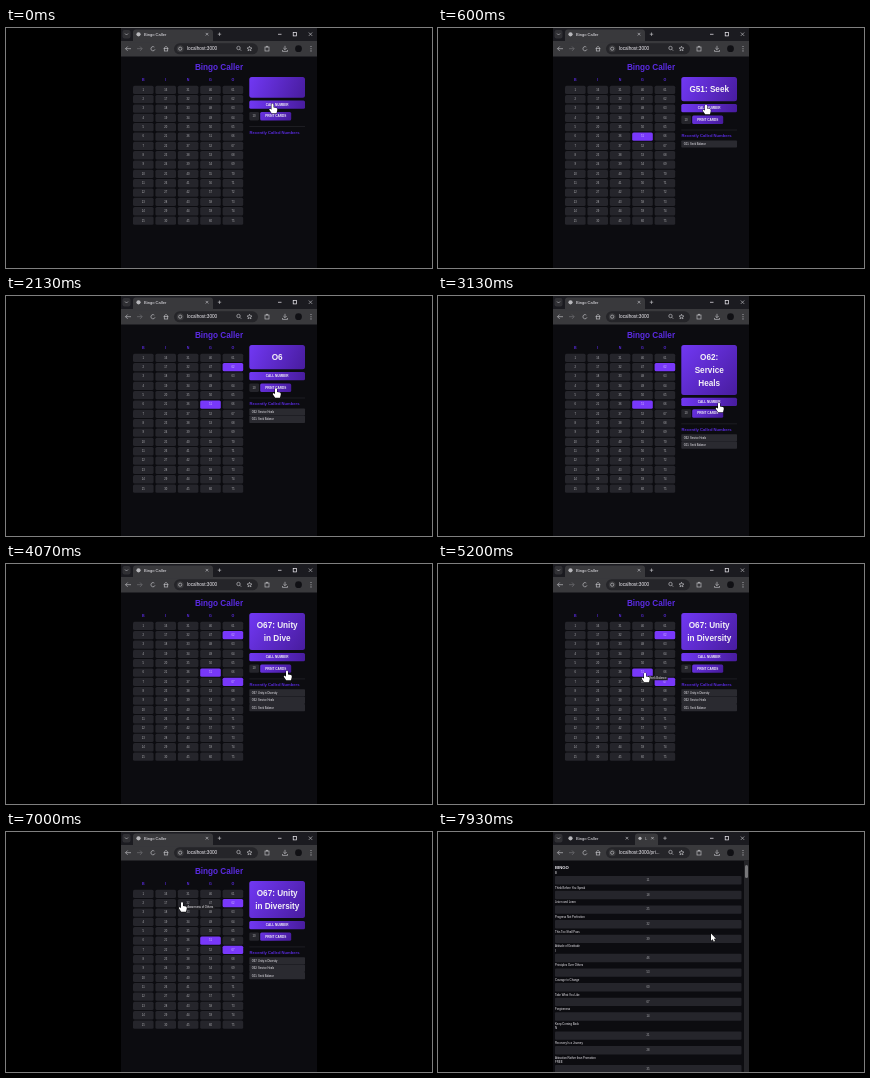
Recreate the animation shown at these times as an HTML page with a canvas. Size 426 by 240 pixels, loop 8000 ms.

```html
<!DOCTYPE html>
<html lang="en">
<head>
<meta charset="utf-8">
<title>Bingo Caller</title>
<style>
  html, body { margin: 0; width: 100%; height: 100%; overflow: hidden; background: #000; }
  canvas { display: block; width: 426px; height: 240px; }
</style>
</head>
<body>
<canvas id="stage"></canvas>
<script>
const LOOP = 8000, TYPE_MS = 50, CARDS_AT = 7800;
const BG = '#0c0c10', CELL = '#25252b', CHROME = '#39393c', STRIP = '#1b1b20';
const WHITE = '#f2f0f6', GREY = '#b8b8bc', VIOLET = '#5a2be0', BRIGHT = '#7838fa';

const calls = [
  { at: 130, col: 3, row: 5, text: 'G51: Seek Balance' },
  { at: 2000, col: 4, row: 1, text: 'O62: Service Heals' },
  { at: 3170, col: 4, row: 6, text: 'O67: Unity in Diversity' }
];

// Pointer path: time, x, y of the hotspot
const pointerPath = [
  [0, 266.5, 75.5], [350, 268, 76.5], [1350, 268, 76.5], [1750, 270, 92], [2250, 270, 92],
  [2900, 281, 106.5], [4250, 281, 106.5], [4850, 207, 108.5], [5450, 207, 108.5],
  [6500, 176, 70], [7100, 176, 70], [7550, 273, 101.5], [8000, 273, 101.5]
];

const tips = [
  { from: 4900, to: 5500, x: 210, y: 114, text: 'Seek Balance' },
  { from: 6550, to: 7120, x: 180, y: 75.5, text: 'Awareness of Others' }
];

const card = [
  ['BINGO', 'B', ['Think Before You Speak', 'Listen and Learn', 'Progress Not Perfection',
    'This Too Shall Pass', 'Attitude of Gratitude']],
  ['', 'I', ['Principles Over Others', 'Courage to Change', 'Take What You Like',
    'Forgiveness', 'Keep Coming Back']],
  ['', 'N', ['Recovery Is a Journey', 'Attraction Rather than Promotion']],
  ['', 'FREE', ['Easy Does It']]
];

const canvas = document.getElementById('stage');
const ctx = canvas.getContext('2d');
const dpr = window.devicePixelRatio || 1;
canvas.width = 426 * dpr;
canvas.height = 240 * dpr;

const handShape = new Path2D('M-1 1Q0-.8 1 1V4L4 4.6Q5 5 4.8 6.5L4 9.8H-.8L-3.2 6.3Q-3.3 4.8-2 5.3L-1 6.2Z');
const arrowShape = new Path2D('M0 0V7.2L1.7 5.7L2.8 8.2L4 7.6L2.9 5.3H5Z');

function box(x, y, w, h, fill, radius = 0) {
  ctx.fillStyle = fill;
  ctx.beginPath();
  ctx.roundRect(x, y, w, h, radius);
  ctx.fill();
}

function label(text, x, y, size, fill, align = 'left', weight = '') {
  ctx.font = `${weight} ${size}px "Liberation Sans", Arial, sans-serif`;
  ctx.textAlign = align;
  ctx.textBaseline = 'middle';
  ctx.fillStyle = fill;
  ctx.fillText(text, x, y);
}

function line(points, color = GREY, width = 0.7) {
  ctx.strokeStyle = color;
  ctx.lineWidth = width;
  ctx.beginPath();
  points.forEach(([x, y]) => ctx.lineTo(x, y));
  ctx.stroke();
}

function ring(x, y, r, color = GREY, from = 0, to = 2 * Math.PI) {
  ctx.strokeStyle = color;
  ctx.lineWidth = 0.7;
  ctx.beginPath();
  ctx.arc(x, y, r, from, to);
  ctx.stroke();
}

function dot(x, y, r, color) {
  box(x - r, y - r, 2 * r, 2 * r, color, r);
}

function cross(x, y, r) {
  line([[x - r, y - r], [x + r, y + r]]);
  line([[x - r, y + r], [x + r, y - r]]);
}

function plus(x, y) {
  line([[x - 1.7, y], [x + 1.7, y]]);
  line([[x, y - 1.7], [x, y + 1.7]]);
}

function violet(x, y, w, h) {
  const g = ctx.createLinearGradient(x, y, x + w, y + h);
  g.addColorStop(0, '#7138f4');
  g.addColorStop(1, '#481c9e');
  return g;
}

function drawBrowser(cardsOpen) {
  box(115, 0, 196, 13, STRIP);
  box(115, 13, 196, 15.5, CHROME);
  box(116.5, 2, 8, 8.5, '#303034', 2);
  line([[119, 5.5], [120.5, 7], [122, 5.5]]);

  if (cardsOpen) {
    box(197, 1.5, 23, 13, CHROME, [3, 3, 0, 0]);
    dot(202, 6.3, 1.6, GREY);
    label('L', 207, 6.5, 4.1, GREY);
    cross(214.5, 6.2, 1.2);
  } else {
    box(127, 1.5, 80, 13, CHROME, [3, 3, 0, 0]);
  }
  dot(132.5, 6.3, 2.1, GREY);
  label('Bingo Caller', 138, 6.6, 4.1, WHITE);
  cross(cardsOpen ? 189 : 201, 6.2, 1.3);
  plus(cardsOpen ? 227 : 213.5, 6.2);

  line([[272, 6.3], [275.5, 6.3]], WHITE);
  ctx.strokeRect(287.2, 4.5, 3.4, 3.4);
  cross(304.5, 6.2, 1.7);

  line([[125, 20.7], [119.5, 20.7]]);
  line([[121.7, 18.5], [119.5, 20.7], [121.7, 22.9]]);
  line([[131, 20.7], [136, 20.7]], '#707074');
  line([[134, 18.5], [136.2, 20.7], [134, 22.9]], '#707074');
  ring(147, 20.7, 2.1, GREY, 0.3, 5.4);
  line([[157.5, 20.7], [160, 18.3], [162.5, 20.7]]);
  ctx.strokeRect(158.3, 20.5, 3.4, 2.5);

  box(168, 15.3, 84, 11, '#252529', 5.5);
  dot(174.2, 20.7, 3.5, CHROME);
  ring(174.2, 20.7, 1.6);
  label(cardsOpen ? 'localhost:3000/pri...' : 'localhost:3000', 181, 21, 4.7, WHITE);
  ring(232.5, 20, 1.7);
  line([[233.7, 21.2], [235.2, 22.7]]);
  const star = Array.from({ length: 11 }, (_, i) => {
    const a = i * Math.PI / 5 - Math.PI / 2, r = i % 2 ? 1.1 : 2.6;
    return [243.5 + r * Math.cos(a), 20.8 + r * Math.sin(a)];
  });
  line(star);
  ctx.strokeRect(259, 19, 4, 4);
  dot(261, 18.6, 0.9, GREY);
  line([[279, 17.8], [279, 21.6]]);
  line([[277.3, 20], [279, 21.7], [280.7, 20]]);
  line([[276.5, 22], [276.5, 23.4], [281.5, 23.4], [281.5, 22]]);
  dot(292.5, 20.7, 3.4, '#101014');
  [18.5, 20.7, 22.9].forEach(y => dot(305, y, 0.55, GREY));
}

function wrap(text, width) {
  ctx.font = 'bold 8.2px "Liberation Sans", Arial, sans-serif';
  const lines = [];
  for (const word of text.split(' ').filter(Boolean)) {
    const last = lines.length - 1;
    const joined = lines[last] + ' ' + word;
    if (last >= 0 && ctx.measureText(joined).width <= width) lines[last] = joined;
    else lines.push(word);
  }
  return lines;
}

function drawTable(called) {
  [...'BINGO'].forEach((letter, col) => {
    const x = 127 + col * 22.4;
    label(letter, x + 10.3, 52.2, 3.6, VIOLET, 'center', 'bold');
    for (let row = 0; row < 15; row++) {
      const y = 57.7 + row * 9.34;
      const active = called.some(c => c.col === col && c.row === row);
      box(x, y, 20.6, 8.3, active ? BRIGHT : CELL, 1.5);
      label(col * 15 + row + 1, x + 10.3, y + 4.3, 2.7, active ? '#d8c8ff' : GREY, 'center');
    }
  });
}

function drawPanel(t, called) {
  const current = called[called.length - 1];
  const typed = current ? current.text.slice(0, Math.floor((t - current.at) / TYPE_MS)) : '';
  const lines = wrap(typed, 48);
  const height = lines.length ? 11.3 + 12.9 * lines.length : 20.7;
  const bottom = 49 + height;

  box(243.3, 49, 55.7, height, violet(243, 49, 56, height), 2.5);
  lines.forEach((s, i) => label(s, 271.2, 61.5 + i * 12.9, 8.2, WHITE, 'center', 'bold'));

  box(243.3, bottom + 2.8, 55.7, 8.3, violet(243, bottom, 56, 8), 1.5);
  label('CALL NUMBER', 271.2, bottom + 7.1, 3.1, WHITE, 'center', 'bold');
  box(243.3, bottom + 14.3, 9.8, 8.4, CELL, 1.3);
  label('10', 248, bottom + 18.6, 2.8, GREY, 'center');
  box(254.2, bottom + 14.3, 31, 8.4, violet(254, bottom, 31, 20), 1.5);
  label('PRINT CARDS', 269.7, bottom + 18.6, 3.1, WHITE, 'center', 'bold');

  line([[243.3, bottom + 28.8], [299, bottom + 28.8]], '#29292f', 0.6);
  label('Recently Called Numbers', 243.6, bottom + 34.8, 4.15, VIOLET, 'left', 'bold');
  [...called].reverse().forEach((c, i) => {
    const y = bottom + 39.2 + i * 7.4;
    box(243.3, y, 55.7, 7.2, '#2a2a30', 0.8);
    label(c.text, 245.7, y + 3.8, 2.6, WHITE);
  });
}

function drawCards() {
  label('BINGO', 117, 35.7, 4.2, WHITE, 'left', 'bold');
  let y = 41.3, count = 0;
  for (const [, heading, names] of card) {
    label(heading, 117, y, 2.9, WHITE);
    for (const name of names) {
      box(117, y + 2.8, 186.5, 8.4, CELL, 1);
      label(11 + count++ * 7 % 60, 210, y + 7, 2.7, GREY, 'center');
      label(name, 117, y + 14.5, 2.8, WHITE);
      y += 14.65;
    }
    y += 4.4;
  }
  box(306, 28.5, 5, 212, '#242428');
  box(307, 33, 3, 13, '#77777a', 1.5);
}

function pointerAt(t) {
  const i = Math.max(1, pointerPath.findIndex(p => p[0] > t));
  const [t0, x0, y0] = pointerPath[i - 1], [t1, x1, y1] = pointerPath[i];
  const u = (t - t0) / (t1 - t0), k = u * u * (3 - 2 * u);
  return [x0 + (x1 - x0) * k, y0 + (y1 - y0) * k];
}

function drawPointer(t) {
  const [x, y] = pointerAt(t);
  const inDisplay = t > 700 && t < 1500;
  if (inDisplay) {
    line([[x, y - 1], [x, y + 3.5]], '#c99ab8', 0.6);
    return;
  }
  const shape = t >= CARDS_AT || x > 238 && x < 243 ? arrowShape : handShape;
  ctx.save();
  ctx.translate(x, y);
  ctx.fillStyle = '#fff';
  ctx.strokeStyle = '#000';
  ctx.lineWidth = 0.8;
  ctx.stroke(shape);
  ctx.fill(shape);
  ctx.restore();
}

function drawTip({ x, y, text }) {
  ctx.font = '2.8px "Liberation Sans", Arial, sans-serif';
  box(x, y - 2.3, ctx.measureText(text).width + 2.5, 4.6, '#202024', 0.6);
  label(text, x + 1.2, y, 2.8, WHITE);
}

function draw(t) {
  ctx.setTransform(dpr, 0, 0, dpr, 0, 0);
  box(0, 0, 426, 240, '#000');
  ctx.save();
  ctx.beginPath();
  ctx.rect(115, 0, 196, 240);
  ctx.clip();
  box(115, 0, 196, 240, BG);
  const cardsOpen = t >= CARDS_AT;
  drawBrowser(cardsOpen);
  if (cardsOpen) {
    drawCards();
  } else {
    const called = calls.filter(c => t >= c.at);
    label('Bingo Caller', 213, 39.3, 8.2, VIOLET, 'center', 'bold');
    drawTable(called);
    drawPanel(t, called);
    tips.filter(tip => t >= tip.from && t < tip.to).forEach(drawTip);
  }
  drawPointer(t);
  ctx.restore();
}

function frame() {
  draw(performance.now() % LOOP);
  requestAnimationFrame(frame);
}
frame();
</script>
</body>
</html>
```
